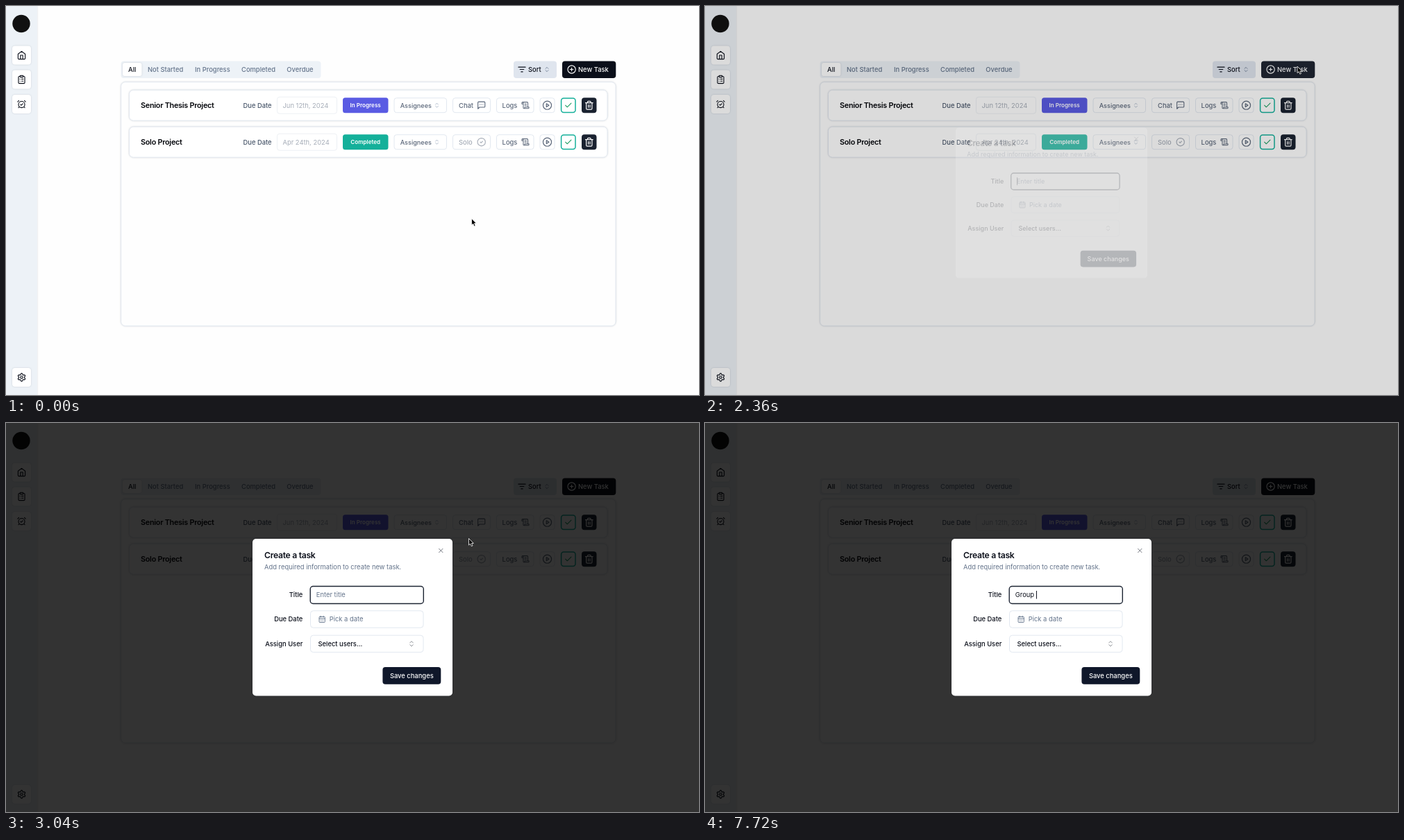
An HTML page that plays this animation: 998x561 px, repeating every 8 s.

```html
<!DOCTYPE html>
<html lang="en">
<head>
<meta charset="utf-8">
<title>Task board</title>
<style>
  html, body { margin: 0; width: 100%; height: 100%; overflow: hidden; background: #fefefe; }
  svg { display: block; font-family: Inter, sans-serif; }
  text { white-space: pre; }
  .lift { filter: drop-shadow(0 .7px .8px rgba(15, 23, 42, .16)); }
</style>
</head>
<body>
<svg id="stage" width="998" height="561" viewBox="0 0 998 561"></svg>
<script>
const INK = '#0b0f1a', SLATE = '#64748b', LINE = '#e2e8f0', TEAL = '#14b09a';
const LOOP = 8000, FRAME = 40, SIZE = 9.4;

const ring = 'M2 12a10 10 0 1 0 20 0a10 10 0 1 0-20 0';
const polar = (r, deg) => {
  const a = deg * Math.PI / 180;
  return `${(12 + r * Math.sin(a)).toFixed(2)} ${(12 - r * Math.cos(a)).toFixed(2)}`;
};
const tooth = [[6.9, -28], [8.6, -14], [10, -6], [10, 6], [8.6, 14], [6.9, 28]];
const cog = [0, 60, 120, 180, 240, 300]
  .flatMap(turn => tooth.map(([r, a]) => polar(r, a + turn))).join('L');

const icons = {
  home: 'M3 9l9-7 9 7v11a2 2 0 0 1-2 2H5a2 2 0 0 1-2-2zM9 22V12h6v10',
  list: 'M9 2h6a1 1 0 0 1 1 1v2a1 1 0 0 1-1 1H9a1 1 0 0 1-1-1V3a1 1 0 0 1 1-1zM16 4h2a2 2 0 0 1 2 2v14a2 2 0 0 1-2 2H6a2 2 0 0 1-2-2V6a2 2 0 0 1 2-2h2M12 11h4M12 16h4M8 11h.01M8 16h.01',
  alarm: 'M4 13a8 8 0 1 0 16 0a8 8 0 1 0-16 0M5 3L2 6M22 6l-3-3M6.4 18.7L4 21M17.6 18.7L20 21M9 13l2 2 4-4',
  cog: `M${cog}ZM9 12a3 3 0 1 0 6 0a3 3 0 1 0-6 0`,
  filter: 'M3 6h18M7 12h10M10 18h4',
  plus: ring + 'M8 12h8M12 8v8',
  sorter: 'M7 15l5 5 5-5M7 9l5-5 5 5',
  chat: 'M21 15a2 2 0 0 1-2 2H7l-4 4V5a2 2 0 0 1 2-2h14a2 2 0 0 1 2 2zM8 10h.01M12 10h.01M16 10h.01',
  done: ring + 'M9 12l2 2 4-4',
  scroll: 'M8 21h12a2 2 0 0 0 2-2v-2H10v2a2 2 0 1 1-4 0V5a2 2 0 1 0-4 0v3h4M19 17V5a2 2 0 0 0-2-2H4M15 8h-5M15 12h-5',
  play: ring + 'M10 8l6 4-6 4z',
  check: 'M20 6L9 17l-5-5',
  trash: 'M3 6h18M19 6v14a2 2 0 0 1-2 2H7a2 2 0 0 1-2-2V6M8 6V4a2 2 0 0 1 2-2h4a2 2 0 0 1 2 2v2M10 11v6M14 11v6',
  calendar: 'M5 4h14a2 2 0 0 1 2 2v14a2 2 0 0 1-2 2H5a2 2 0 0 1-2-2V6a2 2 0 0 1 2-2zM16 2v4M8 2v4M3 10h18M8 14h.01M12 14h.01M16 14h.01M8 18h.01M12 18h.01M16 18h.01',
  close: 'M18 6L6 18M6 6l12 12'
};

const icon = (name, cx, cy, size, color = INK, width = 2) =>
  `<path d="${icons[name]}" transform="translate(${cx - size / 2} ${cy - size / 2}) scale(${size / 24})"
    fill="none" stroke="${color}" stroke-width="${width}" stroke-linecap="round" stroke-linejoin="round"/>`;

const box = (x, y, right, bottom, fill, stroke = 'none', rx = 3.5, extra = '') =>
  `<rect x="${x}" y="${y}" width="${right - x}" height="${bottom - y}" rx="${rx}" fill="${fill}" stroke="${stroke}" ${extra}/>`;

// cy is the middle of the capital letters
const label = (x, cy, words, fill = INK, weight = 500, size = SIZE, extra = '') =>
  `<text x="${x}" y="${cy + size * .364}" fill="${fill}" font-weight="${weight}" font-size="${size}" ${extra}>${words}</text>`;

const LIFT = 'class="lift"', MIDDLE = 'text-anchor="middle"', END = 'text-anchor="end"';
const TIGHT = 'letter-spacing="-.025em"';

function sidebar() {
  const buttons = [['home', 71], ['list', 106], ['alarm', 141.5], ['cog', 535.5]];
  return `<rect width="45" height="561" fill="#edf2f7" style="filter:drop-shadow(.7px 0 1px rgba(15,23,42,.16))"/>
    <circle cx="22" cy="25.5" r="12.7" fill="#111"/>` +
    buttons.map(([name, y]) =>
      box(9, y - 13.5, 36, y + 13.5, '#fff', 'none', 4, LIFT) + icon(name, 22.5, y, 13.6)).join('');
}

function toolbar() {
  const tabs = [[204, 'Not Started'], [272, 'In Progress'], [339, 'Completed'], [404.3, 'Overdue']];
  return box(165.5, 79.5, 453.5, 104, '#edf2f7', 'none', 4) +
    box(168, 82, 195.5, 101, '#fff', 'none', 3, LIFT) + label(176, 91.5, 'All') +
    tabs.map(([x, name]) => label(x, 91.5, name, SLATE)).join('') +
    box(731, 79.5, 793, 104, '#dfe5ee', 'none', 4) + icon('filter', 743, 91.5, 13.5) +
    label(752, 91.5, 'Sort') + icon('sorter', 779, 91.5, 9.5, SLATE) +
    box(801, 79.5, 878.3, 104, INK, 'none', 4, 'id="newTask"') +
    icon('plus', 814.6, 91.5, 13.5, '#fff') + label(824, 91.5, 'New Task', '#fff');
}

function row(y, title, date, status, color, side, sideIcon, sideColor) {
  const top = y - 10.5, bottom = y + 10.5, grey = '#5b677a';
  const button = (x, right) => box(x, top, right, bottom, '#fff', LINE);
  return box(177.5, y - 22, 866, y + 22, '#fff', LINE, 6, LIFT) +
    label(194, y, title, '#05070c', 600, 10.85, TIGHT) +
    label(341.5, y, 'Due Date', '#475569') +
    box(390.5, y - 12, 476.5, y + 12, '#fff', '#edf0f4') + label(398.5, y, date, '#a6adb8', 400) +
    box(485, y - 11, 550.5, y + 11, color) + label(517.7, y, status, '#fff', 600, 8.1, MIDDLE) +
    button(559, 634.5) + label(567.7, y, 'Assignees', grey, 500, 9.1) + icon('sorter', 620.5, y, 9, '#94a3b8') +
    button(643.5, 697.5) + label(652, y, side, sideColor) + icon(sideIcon, 684.7, y, 13.5, sideColor) +
    button(706.5, 760) + label(714.6, y, 'Logs', grey) + icon('scroll', 748, y, 12.2, grey) +
    button(769, 790) + icon('play', 779.5, y, 14.5, grey) +
    box(799.6, top + .2, 820, bottom - .2, '#fff', TEAL, 3.5, 'stroke-width="1.5"') + icon('check', 809.8, y, 12.5, '#159a5c') +
    box(829, y - 11, 850.5, y + 11, '#1a2230', 'none', 4) + icon('trash', 839.8, y, 14.2, '#fff');
}

function dialog() {
  const field = y => box(438.5, y - 12.2, 601, y + 12.2, '#fff', LINE, 4);
  const names = [[248, 'Title'], [283, 'Due Date'], [318.4, 'Assign User']];
  return box(355, 167, 643, 393.5, '#fff', 'none', 5, LIFT) +
    label(372, 190.3, 'Create a task', INK, 600, 12.2, TIGHT) +
    label(372, 207.2, 'Add required information to create new task.', SLATE, 400) +
    icon('close', 626.3, 184, 11, '#6b6f78') +
    names.map(([y, name]) => label(427.3, y, name, INK, 500, SIZE, END)).join('') +
    box(438.2, 235.5, 601.3, 260.5, '#fff', '#1d2533', 4, 'stroke-width="1.4"') +
    label(446.8, 248, '', SLATE, 400, SIZE, 'id="entry"') +
    '<rect id="caret" y="242" width="1" height="11.6" fill="#0b0f1a"/>' +
    field(283) + icon('calendar', 455.2, 283, 11, SLATE) + label(465.7, 283, 'Pick a date', SLATE, 400) +
    field(318.4) + label(449.5, 318.4, 'Select users...') + icon('sorter', 584, 318.4, 11, '#85888f') +
    box(542.4, 352, 626.3, 376.7, '#0f172a', 'none', 4) + label(584.3, 364.4, 'Save changes', '#fff', 500, SIZE, MIDDLE);
}

const beam = 'M-2.4-6Q0-6 0-4.6V4.6Q0 6-2.4 6M2.4-6Q0-6 0-4.6M2.4 6Q0 6 0 4.6M-1.3 1.3H1.3';
document.getElementById('stage').innerHTML = '<rect width="998" height="561" fill="#fefefe"/>' +
  sidebar() + toolbar() +
  box(165.7, 109.7, 878, 461.3, '#fefefe', LINE, 6, LIFT) +
  row(143.2, 'Senior Thesis Project', 'Jun 12th, 2024', 'In Progress', '#5a5be3', 'Chat', 'chat', '#5b677a') +
  row(196.2, 'Solo Project', 'Apr 24th, 2024', 'Completed', TEAL, 'Solo', 'done', '#a6adb8') +
  `<rect id="shade" width="998" height="561"/>
  <g id="dialog">${dialog()}</g>
  <path id="arrow" d="M0 0V9.6L2.2 7.6 3.8 11.2 5.5 10.4 4 7H6.8Z" stroke="#fff" stroke-width=".8"/>
  <g id="beam" fill="none"><path d="${beam}" stroke="#fff" stroke-width="2.4"/><path d="${beam}" stroke="#000" stroke-width="1.1"/></g>`;

const el = Object.fromEntries([...document.querySelectorAll('[id]')].map(node => [node.id, node]));
const progress = (t, start, length) => Math.min(1, Math.max(0, (t - start) / length));
const smooth = x => x * x * (3 - 2 * x);
const mix = (a, b, p) => a + (b - a) * p;
const show = (node, on) => node.setAttribute('visibility', on ? 'visible' : 'hidden');

// CSS "ease": cubic-bezier(.25, .1, .25, 1)
function ease(x) {
  let low = 0, high = 1, s = .5;
  for (let i = 0; i < 20; i++) {
    s = (low + high) / 2;
    if (.75 * s * (1 - s) + s ** 3 < x) low = s; else high = s;
  }
  return .3 * s * (1 - s) ** 2 + 3 * s * s * (1 - s) + s ** 3;
}

const moves = [
  [0, 120, 670.5, 306.5, 697, 208],
  [1000, 800, 697, 208, 853, 87],
  [2680, 720, 853, 87, 480, 246]
];
const hidden = [[640, 720], [2320, 2360], [3600, 3840], [6400, LOOP]];
const typing = [[6400, 'G'], [6880, 'Gr'], [7000, 'Gro'], [7120, 'Grou'], [7320, 'Group'], [7720, 'Group ']];

function drawPointer(t) {
  const [start, length, x0, y0, x1, y1] = moves.findLast(move => t >= move[0]);
  const p = smooth(progress(t, start, length));
  const x = mix(x0, x1, p), y = mix(y0, y1, p);
  const visible = !hidden.some(([from, to]) => t >= from && t < to);
  const overField = t > 2680 && x < 601 && y > 235;
  el.arrow.setAttribute('transform', `translate(${x} ${y})`);
  el.beam.setAttribute('transform', `translate(${x} ${y})`);
  show(el.arrow, visible && !overField);
  show(el.beam, visible && overField);
}

function drawDialog(t) {
  const p = ease(progress(t, 2338, 150)), open = t > 2338;
  el.shade.setAttribute('opacity', .8 * p);
  el.dialog.setAttribute('opacity', open ? p : 0);
  el.dialog.setAttribute('transform',
    `translate(499 ${280.25 + 4.5 * (1 - p)}) scale(${.95 + .05 * p}) translate(-499 -280.25)`);

  const typed = typing.findLast(step => t >= step[0])?.[1];
  el.entry.textContent = typed ?? 'Enter title';
  el.entry.setAttribute('fill', typed ? INK : SLATE);
  el.caret.setAttribute('x', 447 + (typed ? el.entry.getComputedTextLength() : 0));
  show(el.caret, open && (typed || Math.floor((t - 2340) / 500) % 2 === 0));
}

function draw(now) {
  const t = Math.floor(now % LOOP / FRAME) * FRAME;
  const hover = progress(t, 1720, 150) - progress(t, 2360, 150);
  el.newTask.setAttribute('fill', `rgb(${mix(11, 31, hover)},${mix(15, 37, hover)},${mix(26, 50, hover)})`);
  drawDialog(t);
  drawPointer(t);
  requestAnimationFrame(draw);
}
requestAnimationFrame(draw);
</script>
</body>
</html>
```
